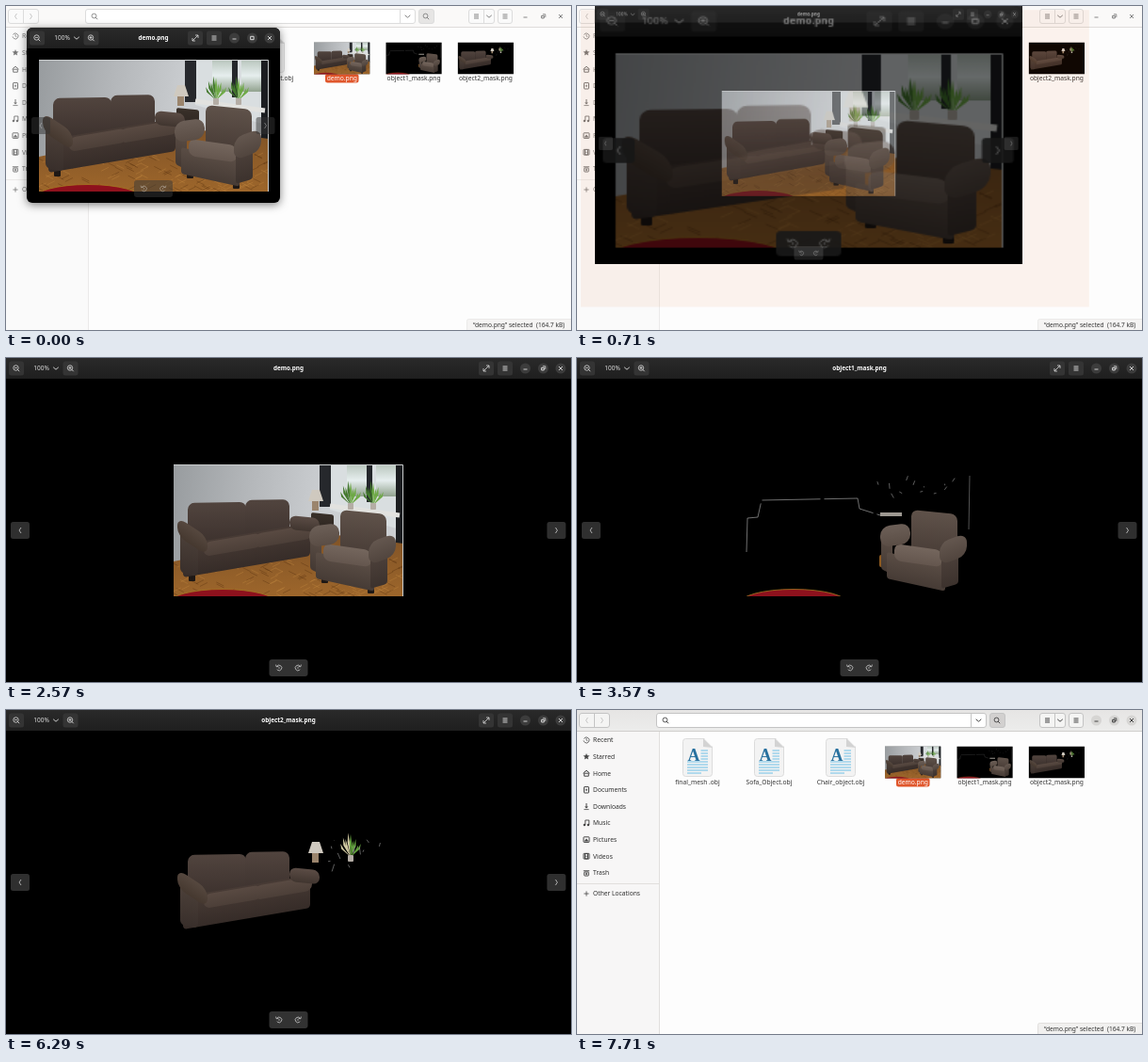
An HTML page with a canvas that plays this animation: 600x344 px, repeating every 8 s.

```html
<!DOCTYPE html>
<html lang="en">
<head>
<meta charset="utf-8">
<title>Image viewer</title>
<style>
html, body { margin: 0; width: 100%; height: 100%; overflow: hidden; background: #fdfdfd; }
canvas { display: block; }
</style>
</head>
<body>
<canvas id="stage" width="600" height="344"></canvas>
<script>
const W = 600, H = 344, LOOP = 8000;
const PIC_W = 244, PIC_H = 140;
const SMALL = [22, 23, 269, 186], FULL = [0, 0, W, H];
const stage = document.getElementById('stage').getContext('2d');
const layer = document.createElement('canvas').getContext('2d');
let c = stage;   // current drawing context

const clamp = v => Math.max(0, Math.min(1, v));
const easeOut = k => 1 - (1 - k) ** 2;
const mixRect = (a, b, k) => a.map((v, i) => v + (b[i] - v) * k);
const times = (n, f) => { for (let i = 0; i < n; i++) f(i); };
const random = seed => () => (seed = seed * 16807 % 2147483647) / 2147483647;

function box(x, y, w, h, fill, r = 0, stroke) {
  c.beginPath();
  c.roundRect(x, y, w, h, r);
  if (fill) { c.fillStyle = fill; c.fill(); }
  if (stroke) { c.strokeStyle = stroke; c.lineWidth = 1; c.stroke(); }
}
function poly(fill, ...xy) {
  c.beginPath();
  for (let i = 0; i < xy.length; i += 2) c.lineTo(xy[i], xy[i + 1]);
  c.fillStyle = fill;
  c.fill();
}
function line(color, width, ...xy) {
  c.beginPath();
  for (let i = 0; i < xy.length; i += 2) c.lineTo(xy[i], xy[i + 1]);
  c.strokeStyle = color;
  c.lineWidth = width;
  c.stroke();
}
function arc(x, y, r, color, from = 0, to = 7) {
  c.beginPath();
  c.arc(x, y, r, from, to);
  c.strokeStyle = color;
  c.lineWidth = 0.8;
  c.stroke();
}
const disc = (x, y, r, fill) => box(x - r, y - r, 2 * r, 2 * r, fill, r);
function text(s, x, y, color, size = 6.7, align = 'center', weight = '400') {
  c.font = `${weight} ${size}px "Noto Sans", "Open Sans", sans-serif`;
  c.textAlign = align;
  c.fillStyle = color;
  c.fillText(s, x, y + 2.4);
}
function at(x, y, draw) {
  c.save();
  c.translate(x, y);
  draw();
  c.restore();
}
function fade(x, y, ...colors) {
  const g = c.createLinearGradient(0, 0, x, y);
  colors.forEach((k, i) => g.addColorStop(i / (colors.length - 1), k));
  return g;
}

// Furniture is built from rounded boxes whose top runs at a slope
function cushion(x, y, w, h, slope, light, dark, r = 7) {
  at(x, y, () => {
    c.transform(1, slope, 0, 1, 0, 0);
    box(0, 0, w, h, fade(0, h, light, dark), r);
  });
}
function sofa() {
  times(2, i => cushion(15 + 61 * i, 41 - 3 * i, 62 - 15 * i, 42, -0.02, '#51443e', '#3d322e'));
  cushion(10, 85, 135, 35, -0.17, '#483b35', '#362c28', 4);
  times(2, i => cushion(32 + 54 * i, 83 - 9 * i, 61, 15, -0.17, '#594a42', '#4c3f38'));
  cushion(123, 54, 32, 15, 0.1, '#5b4c45', '#40352f');
  cushion(7, 70, 19, 45, 0.2, '#4d413a', '#392f2b', 5);
  cushion(4, 56, 32, 20, 0.65, '#56483f', '#45382f', 9);
}
function chair() {
  cushion(177, 48, 49, 46, 0.1, '#5f524a', '#483c36');
  cushion(145, 77, 12, 34, 0.5, '#594c44', '#443933', 3);
  cushion(151, 93, 62, 28, 0.22, '#5a4d45', '#463b35', 3);
  cushion(159, 84, 51, 18, 0.14, '#74665d', '#64564e');
  cushion(209, 98, 18, 34, -0.3, '#4d413b', '#3c322d', 3);
  cushion(144, 66, 32, 22, -0.12, '#6c5f57', '#5a4d45', 10);
  cushion(207, 83, 29, 24, -0.35, '#64574f', '#51453e', 10);
}
function rug() {
  c.beginPath();
  c.ellipse(52, 148, 58, 15.5, 0, 0, 7);
  c.fillStyle = '#8e111d';
  c.fill();
  c.strokeStyle = '#a57922';
  c.lineWidth = 0.8;
  c.stroke();
}
function lamp() {
  poly('#cfc9bf', 147, 27, 155, 27, 159, 39, 143, 39);
  box(147, 39, 7, 10, '#9b856d');
}
function plant(x, left, right) {
  at(x, 43, () => {
    for (let i = -4; i <= 4; i++) {
      const tip = i * 2.7, top = -24 + Math.abs(i) * 2.5 + i % 2 * 4;
      poly(i < 0 ? left : right, 0, 0, tip * 0.8 - 1.2, top * 0.6, tip, top, tip * 0.8 + 1.2, top * 0.6);
    }
    box(-3, -2, 6, 7, '#b4ada5', 1);
  });
}
function floor() {
  poly(fade(0, PIC_H, '#54351c', '#7f5226', '#9d662b'), 0, 103, 150, 72, PIC_W, 84, PIC_W, PIC_H, 0, PIC_H);
  const next = random(7);
  times(170, () => {
    const x = next() * PIC_W, y = 100 + next() * 40, d = next() < 0.5 ? 2 : -2;
    line(next() < 0.5 ? 'rgba(80,45,12,.35)' : 'rgba(205,145,70,.3)', 1, x - 4, y - d, x + 4, y + d);
  });
}
function room() {
  box(0, 0, PIC_W, PIC_H, fade(165, 20, '#989c9f', '#b4b7ba', '#cccfd2'));
  poly('#d9dee0', 166, 0, PIC_W, 0, PIC_W, 70, 166, 48);
  for (const x of [184, 215]) {
    box(x, 0, 21, 34, fade(0, 34, '#b9c6bd', '#e6eeee', '#91a28e'));
    box(x + 21, 0, 6, 40, '#24272b');
  }
  box(155, 0, 12, 45, '#26282c');
  box(236, 0, 8, 88, '#1b1d20');
  line('#e2e2df', 5, 166, 44, 240, 54);
  floor();
  cushion(146, 51, 24, 24, 0.1, '#393029', '#29221e', 2);
  plant(188, '#43782d', '#6da945');
  plant(212, '#43782d', '#6da945');
  for (const [x, y] of [[16, 117], [157, 119], [206, 130]]) box(x, y, 7, 7, '#1e1815', 1);
  rug();
  lamp();
  sofa();
  chair();
  line('#c9cccd', 1, 0, 0.5, 243.5, 0.5, 243.5, PIC_H);
}
// Leftover edge fragments scattered over the window area
function flecks(seed, count, x, y, w, h) {
  const next = random(seed);
  times(count, () => {
    const px = x + next() * w, py = y + next() * h;
    line('#888', 0.7, px, py, px + next() * 6 - 3, py + next() * 12 - 4);
  });
}
function chairMask() {
  rug();
  c.setLineDash([62, 4]);
  line('#a0a0a0', 0.7, 2, 93, 3, 57, 14, 56, 18, 38, 120, 36, 122, 47, 144, 54);
  c.setLineDash([]);
  line('#777', 0.7, 239, 12, 238, 69);
  flecks(11, 12, 142, 10, 82, 26);
  box(144, 51, 23, 4, '#9d9891');
  box(143, 96, 5, 13, '#8c591f', 2);
  chair();
}
function sofaMask() {
  lamp();
  plant(188, '#d3cca3', '#62a13d');
  flecks(29, 12, 164, 25, 62, 28);
  sofa();
}
function picture(kind, x, y, scale = 1) {
  at(x, y, () => {
    c.scale(scale, scale);
    c.beginPath();
    c.rect(0, 0, PIC_W, PIC_H);
    c.clip();
    box(0, 0, PIC_W, PIC_H, '#000');
    kind();
  });
}

// Small interface icons
const chevron = (x, y, k) => line(k, 0.9, x - 2.8, y - 1.2, x, y + 1.2, x + 2.8, y - 1.2);
const angle = (x, y, d, k) => line(k, 0.8, x + d, y - 3, x - d, y, x + d, y + 3);
const menu = (x, y, k) => times(3, i => line(k, 0.9, x - 2.5, y - 2 + 2 * i, x + 2.5, y - 2 + 2 * i));
const plus = (x, y, r, k) => { line(k, 0.8, x - r, y, x + r, y); line(k, 0.8, x, y - r, x, y + r); };
function lens(x, y, k, r = 2.4) {
  arc(x - 0.5, y - 0.5, r, k);
  line(k, 0.9, x + 1.2, y + 1.2, x + 3.2, y + 3.2);
}
function windowButtons(w, fill, k, closeHot) {
  [48.5, 29.5, 11].forEach((d, i) => fill && disc(w - d, 11, 5.5, closeHot && i === 2 ? '#606060' : fill));
  line(k, 0.9, w - 50.5, 12, w - 46.5, 12);
  for (const s of [-2, 2]) line(k, 0.9, w - 13, 11 - s, w - 9, 11 + s);
  const restore = w === W;
  box(w - 31.3, restore ? 10.3 : 9.3, restore ? 2.6 : 3.4, restore ? 2.6 : 3.4, null, 0, k);
  if (restore) line(k, 0.8, w - 30, 8.8, w - 27.2, 8.8, w - 27.2, 12);
}

// Renders a viewer window of any size into the layer
function viewer(w, h, title, kind, { controls = 0.9, nextHot, closeHot } = {}) {
  layer.canvas.width = w;
  layer.canvas.height = h;
  c = layer;
  const ink = '#dedede', my = (h + 22) / 2;
  if (w < W) { c.beginPath(); c.roundRect(0, 0, w, h, 6); c.clip(); }
  box(0, 0, w, h, '#000');
  box(0, 0, w, 22, fade(0, 22, '#2a2a2a', '#1f1f1f'));
  picture(kind, Math.round((w - PIC_W) / 2), my - PIC_H / 2);
  for (const x of [11, 68.5, w - 90, w - 70]) box(x - 8, 3.5, 16, 15, '#343434', 2.5);
  for (const x of [11, 68.5]) lens(x, 11, ink, 2.7);
  line(ink, 0.7, 9, 10.5, 12, 10.5);
  plus(68, 10.5, 1.5, ink);
  text('100%', 37.5, 11, ink, 6.5);
  chevron(53, 11, ink);
  text(title, w / 2, 11, '#fff', 6.4, 'center', '700');
  at(w - 90, 11, () => {
    line(ink, 0.8, -3, 3, 3, -3);
    for (const s of [-1, 1]) line(ink, 0.8, 0, -3 * s, 3 * s, -3 * s, 3 * s, 0);
  });
  menu(w - 70, 11, ink);
  windowButtons(w, '#3c3c3c', ink, closeHot);

  c.globalAlpha = controls;
  for (const s of [1, -1]) {
    const x = s > 0 ? 15 : w - 15.5;
    box(x - 10, my - 9, 20, 18, nextHot && s < 0 ? '#4c4c4c' : '#343434', 2.5);
    angle(x, my, s, ink);
  }
  box(w / 2 - 20.5, h - 24, 41, 18, '#383838', 3);
  for (const s of [-1, 1]) at(w / 2 + s * 10, h - 15, () => {
    c.scale(-s, 1);
    arc(0, 0, 2.8, ink, -2.5, 2.5);
    line(ink, 0.8, -3.4, -3.4, -2.8, -1.2, -0.6, -1.6);
    disc(0, 0, 0.7, ink);
  });
  c = stage;
}
function showLayer(rect, alpha = 1) {
  c.globalAlpha = alpha;
  c.drawImage(layer.canvas, ...rect);
  c.globalAlpha = 1;
}

const places = {
  Recent: k => { arc(0, 0, 3, k, -2.6, 3); line(k, 0.7, 0, -2, 0, 0, 1.4, 1); },
  Starred: k => poly(k, ...Array.from({ length: 10 }, (_, i) => {
    const r = i % 2 ? 1.6 : 3.7, a = i * Math.PI / 5;
    return [r * Math.sin(a), -r * Math.cos(a)];
  }).flat()),
  Home: k => { line(k, 1, -3.5, 0, 0, -3, 3.5, 0); box(-2.3, 0, 4.6, 3, null, 0, k); },
  Documents: k => { box(-2.5, -3.2, 5, 6.4, null, 0.5, k); plus(0, 0, 1.2, k); },
  Downloads: k => { line(k, 1, 0, -3.4, 0, 1); poly(k, -2, 0, 2, 0, 0, 2); line(k, 0.8, -2.6, 3.2, 2.6, 3.2); },
  Music: k => { line(k, 0.9, -1.2, 2, -1.2, -3, 2.8, -3, 2.8, 2); disc(-2.1, 2, 1.2, k); disc(1.9, 2, 1.2, k); },
  Pictures: k => { box(-3, -2.8, 6, 5.6, null, 0.5, k); poly(k, -2.5, 2, 0, -1, 2.5, 2); },
  Videos: k => { box(-3, -2.8, 6, 5.6, null, 0.3, k); box(-1.5, -2.8, 3, 5.6, null, 0, k); line(k, 0.8, -1.5, 0, 1.5, 0); },
  Trash: k => { line(k, 1, -3.2, -2, 3.2, -2); box(-2.3, -0.8, 4.6, 4, null, 0.5, k); disc(0, 1.2, 1, k); },
  'Other Locations': k => plus(0, 0, 2.6, k)
};
function documentIcon(x) {
  at(x, 30, () => {
    box(-15.5, 0.5, 31, 40, '#f3f3f3', 3, '#dcdcdc');
    poly('#fdfdfd', 6, -1, 17, -1, 17, 10);
    poly('#d3d3d3', 6, 0, 6, 9, 16, 10);
    c.font = '700 18px "Liberation Serif", "Noto Serif", serif';
    c.textAlign = 'center';
    c.fillStyle = '#28719f';
    c.fillText('A', -4, 24);
    times(9, i => line('#6fc0e6', 1, i < 4 ? 3.5 : -11, 13 + 3 * i, i > 7 ? 4 : 11, 13 + 3 * i));
  });
}
function files(active) {
  const ink = active ? '#333' : '#777', faint = active ? '#c4c4c4' : '#dcdcdc';
  const edge = active ? '#e1dfdd' : '#ebeae9';
  box(0, 0, W, H, '#fdfdfd');
  box(0, 22, 87, H, active ? '#f7f6f6' : '#fafafa');
  line(edge, 1, 87.5, 22, 87.5, H);
  line(edge, 1, 0, 184.5, 87, 184.5);
  box(0, 0, W, 22, active ? fade(0, 22, '#e6e5e4', '#ececeb') : '#faf9f8');
  line(active ? '#d0cecc' : '#dedcda', 1, 0, 22.5, W, 22.5);
  const button = (x, w, fill = active ? '#f4f4f3' : '#fafafa') => box(x + 0.5, 3.5, w, 15, fill, 2.5, faint);
  button(2, 32);
  button(84, 350, '#fff');
  button(438, 16, active ? '#d2d0cf' : '#e6e5e4');
  button(491, 27);
  button(522, 15);
  for (const x of [18.5, 418.5, 507.5]) line(faint, 1, x, 4, x, 18);
  angle(10.5, 11, 1, '#bbb');
  angle(26.5, 11, -1, '#bbb');
  for (const x of [94, 446]) lens(x, 11, ink);
  for (const x of [426.5, 513]) chevron(x, 11, ink);
  menu(499.5, 11, ink);
  menu(530, 11, ink);
  windowButtons(W, active && '#d6d5d3', ink);

  Object.entries(places).forEach(([name, icon], i) => {
    const y = i < 9 ? 32 + 17.6 * i : 195;
    at(10, y, () => icon(active ? '#444' : '#777'));
    text(name, 17, y, active ? '#2f2f2f' : '#777', 6.7, 'left');
  });
  ['final_mesh .obj', 'Sofa_Object.obj', 'Chair_object.obj'].forEach((name, i) => {
    documentIcon(128 + 76 * i);
    text(name, 128 + 76 * i, 77, '#333');
  });
  box(339, 72, 35.5, 9.6, '#e0562b', 2.5);
  [room, chairMask, sofaMask].forEach((kind, i) => {
    picture(kind, 327 + 76.3 * i, 38.4, 59.5 / PIC_W);
    text(['demo.png', 'object1_mask.png', 'object2_mask.png'][i], 356.8 + 76.3 * i, 77, i ? '#333' : '#fff');
  });
  box(489.5, 332.5, 115, 16, active ? '#f1f0ef' : '#f5f4f3', 2, edge);
  text('“demo.png” selected  (164.7 kB)', 496, 339, '#333', 6.6, 'left');
}

// The small window is dragged to the top edge, then grows to fill the stage
function opening(t) {
  const dragged = mixRect(SMALL, [43, 0, SMALL[2], SMALL[3]], clamp((t - 140) / 430));
  const grow = easeOut(clamp((t - 570) / 420));
  const rect = mixRect(dragged, FULL, grow);
  const tint = 0.07 * clamp((t - 450) / 100) * clamp((960 - t) / 200);
  const snap = easeOut(clamp((t - 470) / 420));
  box(...mixRect(SMALL, FULL, snap), `rgba(226,100,40,${tint})`);
  if (grow > 0) {
    viewer(W, H, 'demo.png', room);
    showLayer(rect);
  }
  viewer(SMALL[2], SMALL[3], 'demo.png', room, { controls: grow ? 0.9 : 0.5 });
  c.save();
  if (!grow) {
    c.shadowColor = 'rgba(0,0,0,.5)';
    c.shadowBlur = 10;
    c.shadowOffsetY = 2;
  }
  showLayer(rect, 1 - grow);
  c.restore();
}
function viewing(t) {
  const [title, kind] = t < 3000 ? ['demo.png', room]
    : t < 5280 ? ['object1_mask.png', chairMask] : ['object2_mask.png', sofaMask];
  const close = easeOut(clamp((t - 7370) / 270)), s = 1 - 0.2 * close;
  viewer(W, H, title, kind, {
    nextHot: (t >= 2860 && t < 3140) || (t >= 5140 && t < 5570),
    closeHot: t >= 7140
  });
  showLayer([W * (1 - s) / 2, H * (1 - s) / 2, W * s, H * s], 1 - close);
}
function draw(t) {
  const closing = t >= 7370;
  if (t < 1000 || closing) files(closing);
  if (t < 1000) opening(t);
  else viewing(t);
}

const start = performance.now();
function tick() {
  draw((performance.now() - start) % LOOP);
  requestAnimationFrame(tick);
}
tick();
</script>
</body>
</html>
```
